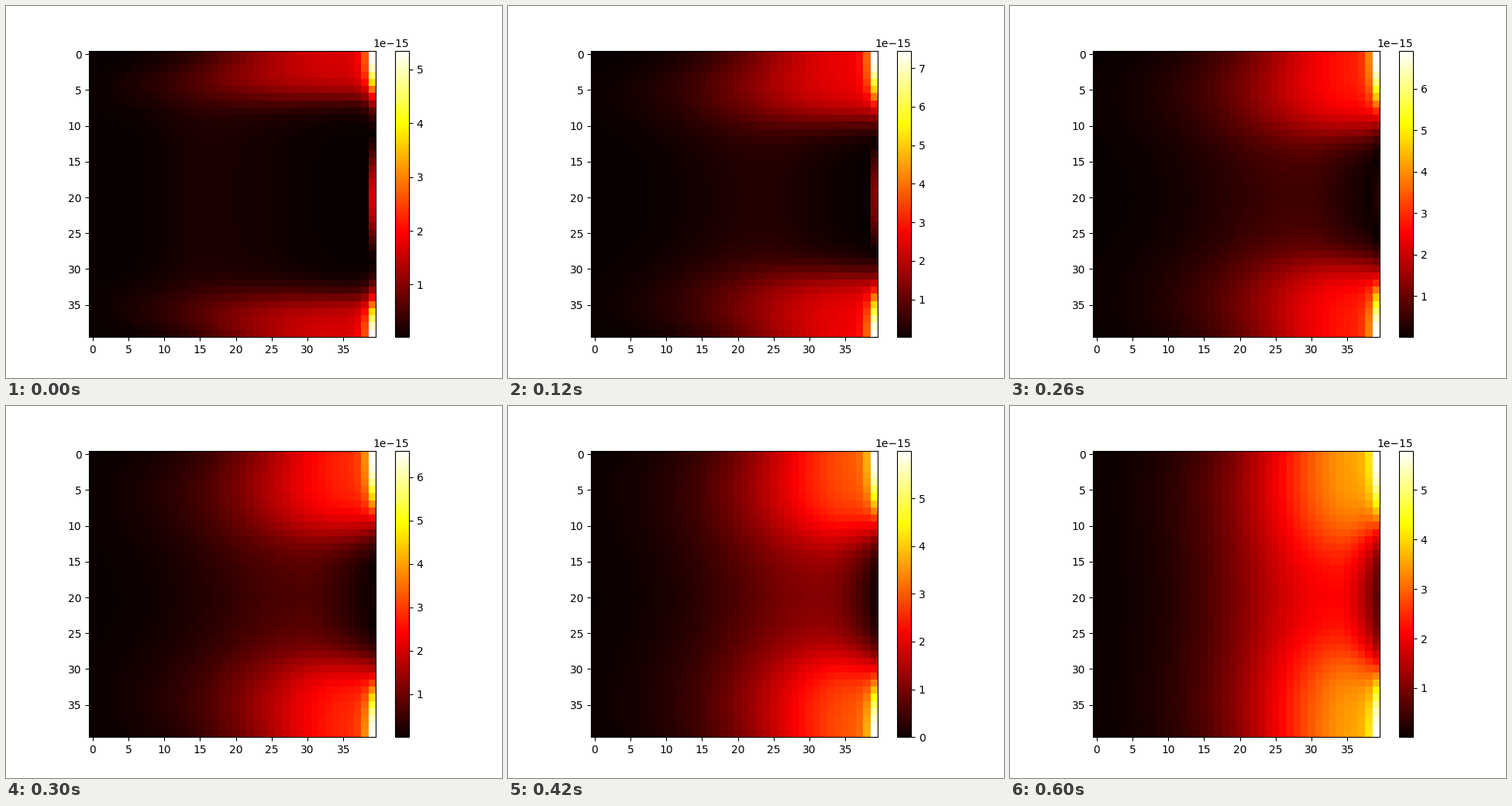
A matplotlib script for the animation above (620 ms loop, 640x480 px).

```python
import numpy as np
import matplotlib.pyplot as plt
from matplotlib.animation import FuncAnimation

N = 40
FRAMES = 31
INTERVAL = 20

rows, cols = np.mgrid[0:N, 0:N].astype(float)
u = np.minimum(rows, N - rows)      # distance to the periodic rim
wall = N - 1 - cols                 # distance to the right column


def relax(start, end, t, tau):
    """Exponential approach from start to end."""
    return end + (start - end) * np.exp(-t / tau)


def peak_value(t):
    return (5.78 + (0.513 * t - 0.43) * np.exp(-(t / 9.5) ** 1.7)) * 1e-15


def lobe(t, s):
    """Bright area near the rim, reaching in from the right."""
    amp = 0.31 + 0.30 * s ** 1.4
    bulge = relax(5.5, 0, t, 14) * (1 - np.exp(-(u / 3) ** 2))
    reach = relax(18.6, 15, t, 5) + bulge
    power = relax(2.6, 1.75, t, 6)
    return amp * np.exp(-(np.maximum(wall - 3, 0) / reach) ** power)


def middle(t, s):
    """Faint glow between the two lobes, drifting right."""
    dx = cols - relax(16, 35, t, 12)
    spread = np.where(dx < 0, relax(7, 16.5, t, 10), relax(13, 6.5, t, 6))
    return (0.03 + 0.33 * s ** 2.2) * np.exp(-(dx / spread) ** 2)


def right_column(t, s):
    """Signed profile along the right boundary."""
    centre = 0.115 * s ** 5 - 0.3 * np.exp(-(t / 9) ** 2)
    dip = np.where(u > 10, np.cos(np.pi * (20 - u) / 20) ** 2, 0)
    width = 6 + 5.2 * s ** 0.85
    return np.exp(-(u / width) ** 2.5) + centre * dip


def field(t):
    s = t / (FRAMES - 1)
    half = relax(6, 11.8, t, 8)
    soft = (1 + 1.2 * s) * (1 + 0.02 * wall)
    mix = 1 / (1 + np.exp((u - half) / soft))
    f = lobe(t, s) * mix + middle(t, s) * (1 - mix)

    edge = right_column(t, s)
    f += (np.maximum(edge, 0) - f) * 0.26 ** wall
    f[:, -1] = edge[:, -1]

    peak = peak_value(t)
    low = 2e-4 * abs(t - 21) * peak     # the minimum touches zero once
    return np.abs(f) * peak, low, peak


fig = plt.figure(figsize=(6.4, 4.8), dpi=100)
data, low, peak = field(0)
im = plt.imshow(data, cmap="hot", vmin=low, vmax=peak)
plt.colorbar(im)


def update(i):
    data, low, peak = field(i)
    im.set_data(data)
    im.set_clim(low, peak)
    return [im]


anim = FuncAnimation(fig, update, frames=FRAMES, interval=INTERVAL,
                     repeat=True, repeat_delay=0, blit=False)
plt.show()
```
